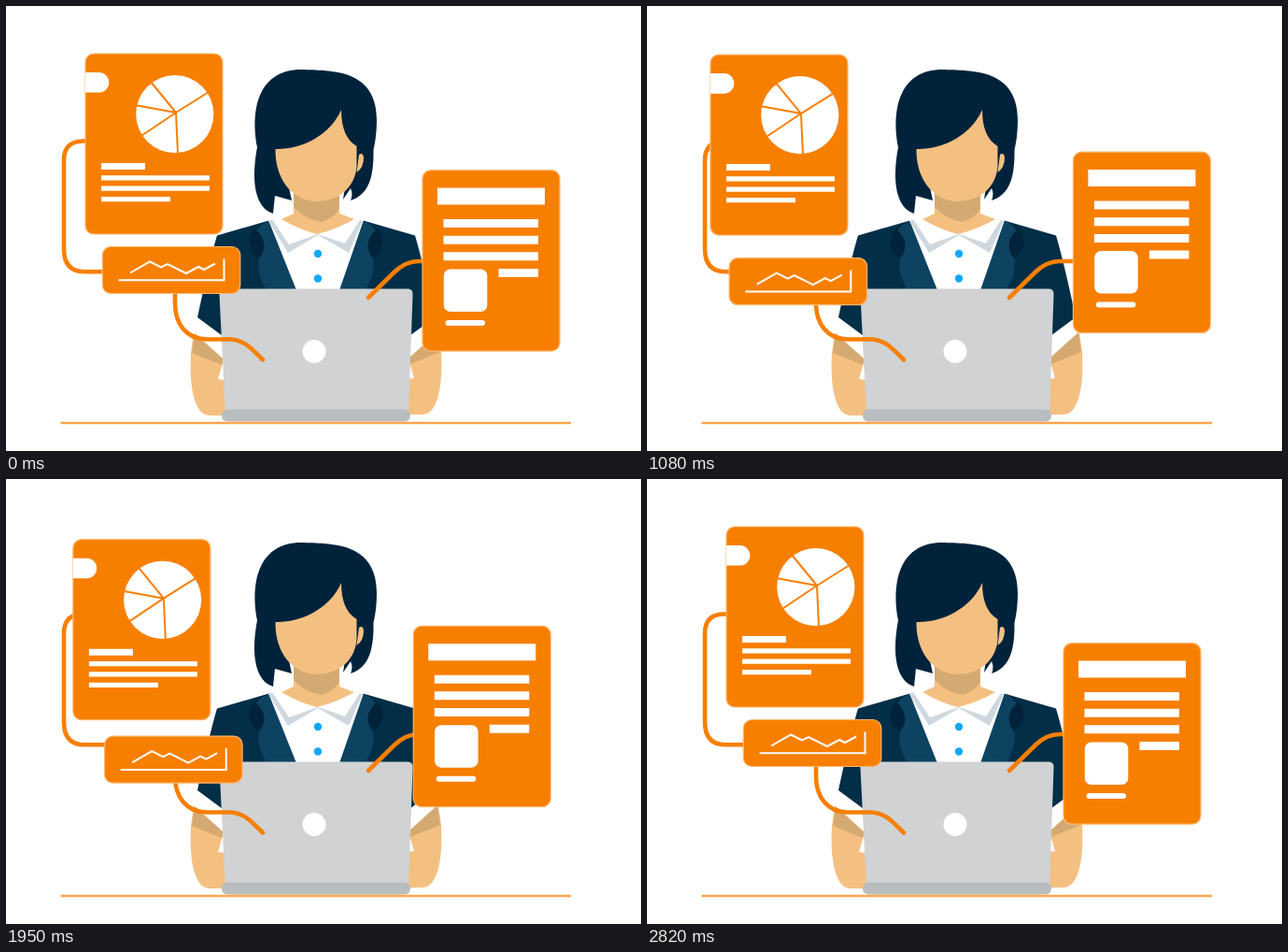
Animation of 680x476 px, one loop 2.85 s. Source, as an HTML page:

```html
<!DOCTYPE html>
<html lang="en">
<head>
<meta charset="utf-8">
<title>Working with reports</title>
<style>
  html, body { margin: 0; width: 100%; height: 100%; overflow: hidden; background: #fff; }
  svg { display: block; width: 680px; height: 476px; }
  .skin { fill: #f4c081; }
  .shade { fill: #d4aa72; }
  .hair { fill: #00233b; }
  .coat { fill: #022e47; }
  .lapel { fill: #0d4361; }
  .wire { fill: none; stroke: #f77f00; stroke-width: 4.6; stroke-linecap: round; }
  .panel { fill: #fff; }
  .card { fill: #f77f00; stroke: #fdb66c; stroke-width: 1.2; }
  .chart { fill: none; stroke: #fff; stroke-width: 2; }
</style>
</head>
<body>
<svg viewBox="0 0 680 476">
  <defs>
    <g id="side">
      <path class="coat" d="M283 229 226 245.500Q218 272 205 333L232 353 260 380H320V303Z"/>
      <path class="hair" d="M283 230C266 234 258 246 261 256Q263 267 274 271L290 255Z"/>
      <path class="lapel" d="M284 229C277 231 271 235 268 240 277 247 280 260 271 270 268 284 275 296 279 304H313Z"/>
    </g>
    <g id="arm">
      <path class="skin" d="M201 350 233 378 227 399 235 400V438H218C201 438 196 405 198 371Z"/>
      <path class="shade" d="M202 350 233 378 231 384 199 371Z"/>
    </g>
  </defs>

  <path stroke="#fba54c" stroke-width="2.600" d="M58.500 446H605"/>

  <!-- worker -->
  <use href="#arm"/>
  <use href="#arm" transform="matrix(-1 0 0 1 664 -1)"/>
  <use href="#side"/>
  <use href="#side" transform="matrix(-1 0 0 1 664 0)"/>
  <path fill="#fff" d="M281 229 311 304H357L383 229Z"/>
  <path fill="#cfd8de" d="M281 230 288 227 334 244 374 227 382 230 367 264 334 245 302 264Z"/>
  <path fill="#fff" d="M285 228 297 226 333 244 372 226 379 229 363 254 334 244 303 255Z"/>
  <path class="skin" d="M308 195V222L295 228Q313 239 333 244 354 239 373 228L357 222V195Z"/>
  <path class="shade" d="M308 200V215Q321 229 338 231 351 227 357 217V200Z"/>
  <path class="hair" d="M269 151C261 108 272 68 316 68C348 69 397 67 397 122Q397 139 393.500 154C394 184 388 202 369 208Q372 201 369 195L361 207 365 180H300L306 208 288 203 286 222C267 216 262 188 269 151Z"/>
  <path class="skin" d="M288.500 153C315 154 347 139 359 111C359 130 364 143 375.500 150V172C374 190 361 209 331 209C305 207 288 184 288.500 153Z"/>
  <path class="skin" d="M375.500 178 378 159Q382 156 383 162 383 173 375.500 178Z"/>
  <g fill="#12a8fa"><circle cx="334" cy="265" r="4.200"/><circle cx="334" cy="291.500" r="4.200"/></g>

  <!-- laptop -->
  <path fill="#d0d2d4" d="M234 302.500H430Q436 302.500 435.500 309L431 438H235L228.500 309Q228 302.500 234 302.500Z"/>
  <rect x="231" y="431.500" width="202" height="13" rx="6" fill="#babdbf"/>
  <circle cx="330" cy="369.500" r="12.500" fill="#fff"/>

  <path class="wire" d="M92 144.500H82Q62 145 62 165V260Q62 284 84 284.300H114"/>
  <path class="wire" d="M181 300V318C181 340 193 356 214 356.500H240C256 357 264 368 275 378.500"/>
  <path class="wire" d="M388 312 416 284.500Q428 273 442 273H466"/>

  <g class="panel" id="report">
    <rect class="card" x="85" y="51" width="147" height="193" rx="9"/>
    <path d="M84.800 71H99.500A10.800 10.800 0 0 1 99.500 92.600H84.800Z"/>
    <circle cx="180.800" cy="115.600" r="41.600"/>
    <path fill="none" stroke="#f77f00" stroke-width="2" d="M182 114 155 81M182 114 217 92M182 114 138 106M182 114 144 139.500M182 114 184 158"/>
    <path d="M102 168h47v7h-47zM102 181.300h116v5.200h-116zM102 192.500h116v5.200h-116zM102 204h74v5.200h-74z"/>
  </g>
  <g class="panel" id="graph">
    <rect class="card" x="103.300" y="257.500" width="147.500" height="50" rx="9"/>
    <path class="chart" d="M133 285.500 154 273.500 166 279.500 173 276 193 286 206 279 212 282 224 275.500M120.500 293.300H233.500V270.500"/>
  </g>
  <g class="panel" id="profile">
    <rect class="card" x="446" y="175.600" width="147" height="193.500" rx="9"/>
    <path d="M462 194.500h115v18h-115zM468.500 228h101.500v9h-101.500zM468.500 245.700h101.500v9h-101.500zM468.500 263.300h101.500v9h-101.500zM527.500 281h42.500v9h-42.500z"/>
    <rect x="468.800" y="281.500" width="46.500" height="45.500" rx="7"/>
    <rect x="470.500" y="336" width="42.500" height="6" rx="3"/>
  </g>
</svg>
<script>
  const STEP = 30, STEPS = 95;

  // Each axis drifts by a * (cos - 1) + b * sin, listed as [a, b].
  const drift = {
    report:  { x: [9.75, -0.1], y: [-4, -8.85] },
    graph:   { x: [5, -9.7],    y: [-9.1, -5.6] },
    profile: { x: [-1.25, 12.25], y: [12, 2.2] }
  };
  const panels = Object.entries(drift).map(([id, axes]) => ({ el: document.getElementById(id), ...axes }));
  const start = performance.now();

  function draw(now) {
    const step = Math.floor(Math.max(0, now - start) / STEP) % STEPS;
    const angle = 2 * Math.PI * step / (STEPS - 1);
    const offset = ([a, b]) => a * (Math.cos(angle) - 1) + b * Math.sin(angle);
    for (const { el, x, y } of panels) {
      el.setAttribute('transform', `translate(${offset(x)} ${offset(y)})`);
    }
    requestAnimationFrame(draw);
  }
  draw(start);
</script>
</body>
</html>
```
